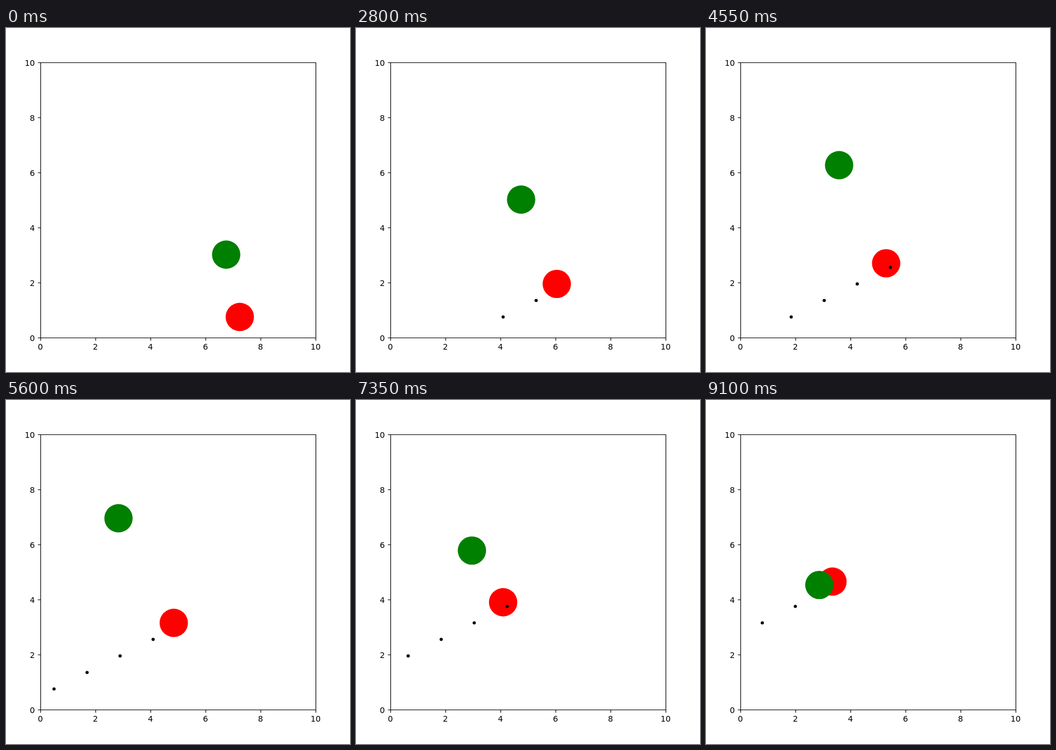
An HTML page with a canvas that plays this animation: 600 px wide and 600 px high, repeating every 9450 ms.

```html
<!DOCTYPE html>
<html>
<head>
<meta charset="utf-8">
<style>
html, body { margin: 0; width: 100%; height: 100%; overflow: hidden; background: #fff; }
canvas { display: block; }
</style>
</head>
<body>
<canvas id="stage" width="600" height="600"></canvas>
<script>
const ctx = document.getElementById('stage').getContext('2d');
const STEP = 350, STEPS = 27;

// Waypoints of the green disc: [step, x, y]
const path = [
  [0, 384, 395.2], [12, 240, 251.2], [13, 232.2, 239.2], [15, 208.2, 215.2],
  [16, 196.2, 206.3], [18, 198.6, 226.6], [21, 202.2, 262.6], [26, 197.7, 322.6]
];

function along(n) {
  const i = Math.max(1, path.findIndex(p => p[0] >= n));
  const [a, ax, ay] = path[i - 1], [b, bx, by] = path[i];
  const t = (n - a) / (b - a);
  return [ax + (bx - ax) * t, ay + (by - ay) * t];
}

const shooter = n => [407.8 - 7.2 * n, 504 - 7.2 * n];

function disc([x, y], r, color) {
  ctx.fillStyle = color;
  ctx.beginPath();
  ctx.arc(x, y, r, 0, 2 * Math.PI);
  ctx.fill();
}

function drawAxes() {
  ctx.strokeStyle = ctx.fillStyle = '#000';
  ctx.lineWidth = 1.11;
  ctx.font = '13.89px "DejaVu Sans", sans-serif';
  ctx.beginPath();
  ctx.rect(60.5, 60.5, 480, 480);
  for (let v = 0; v <= 10; v += 2) {
    const x = 60.5 + 48 * v, y = 540.5 - 48 * v;
    ctx.moveTo(x, 540.5);
    ctx.lineTo(x, 545.4);
    ctx.moveTo(60.5, y);
    ctx.lineTo(55.6, y);
    ctx.textAlign = 'center';
    ctx.fillText(v, x - 0.5, 561);
    ctx.textAlign = 'right';
    ctx.fillText(v, 50.3, y + 5.5);
  }
  ctx.stroke();
}

function draw(n) {
  ctx.fillStyle = '#fff';
  ctx.fillRect(0, 0, 600, 600);
  ctx.save();
  ctx.beginPath();
  ctx.rect(60, 60, 480, 480);
  ctx.clip();
  disc(shooter(n), 24.7, '#f00');
  // A bullet leaves every fourth step and flies left
  for (let k = 0; k < n; k += 4) {
    const [x, y] = shooter(k);
    const bx = x - 21.6 * (n - 1 - k);
    if (bx > 60) disc([bx, y], 2.78, '#000');
  }
  disc(along(n), 24.7, '#008000');
  ctx.restore();
  drawAxes();
}

const start = performance.now();
function tick() {
  draw(Math.floor((performance.now() - start) / STEP) % STEPS);
  requestAnimationFrame(tick);
}
tick();
</script>
</body>
</html>
```
